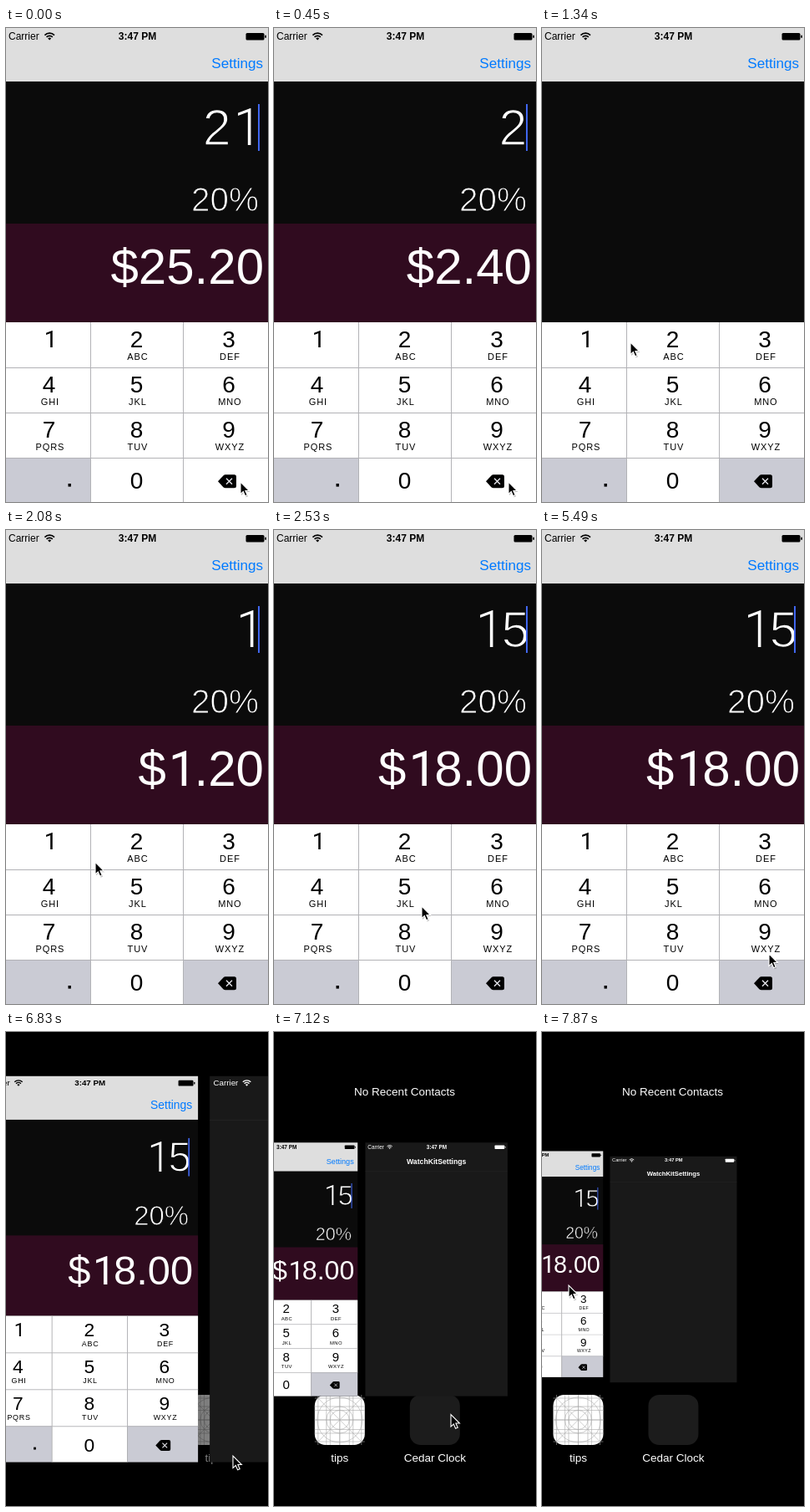
Recreate the animation shown at these times as an HTML page. Size 314x567 px, loop 8000 ms.

```html
<!DOCTYPE html>
<html lang="en">
<head>
<meta charset="utf-8">
<title>Tip calculator</title>
<style>
  html, body { margin: 0; width: 100%; height: 100%; overflow: hidden; background: #000; }
  svg { display: block; width: 100%; height: 100%; }
  text { font-family: "Liberation Sans", Arial, sans-serif; white-space: pre; }
  .one { font-family: Roboto, sans-serif; letter-spacing: -.05em; }
  /* A stroke in the background colour thins the letters. */
  .light { fill: #fff; stroke: #0b0b0b; stroke-width: .026em; }
  .light .one { font-weight: 300; stroke: none; }
  .mid { text-anchor: middle; }
  .end { text-anchor: end; }
  .digit { font-size: 28px; }
  .letters { font-size: 11px; letter-spacing: .9px; }
  .label { font-size: 13.5px; fill: #fff; }
  .guide { fill: none; stroke: #a9a9a9; stroke-width: .6; }
</style>
</head>
<body>
<svg viewBox="0 0 314 567" preserveAspectRatio="none">
  <defs>
    <g id="status" fill="currentColor">
      <text x="3" y="14" font-size="12">Carrier</text>
      <g fill="none" stroke="currentColor" stroke-width="1.7">
        <path d="M46.4 8.6A8.2 8.2 0 0 1 58 8.6"/>
        <path d="M48.6 10.9A5 5 0 0 1 55.8 10.9"/>
      </g>
      <path d="M52.2 14.6L50.2 12.5A2.8 2.8 0 0 1 54.2 12.5Z"/>
      <text class="mid" x="157.5" y="14" font-size="12" font-weight="bold">3:47 PM</text>
      <rect x="287.5" y="6" width="22" height="8.5" rx="1.5"/>
      <rect x="310.3" y="8.6" width="1.6" height="3.4" rx=".8"/>
    </g>
  </defs>

  <rect width="314" height="567"/>

  <g id="switcher">
    <text class="label mid" x="156.5" y="76">No Recent Contacts</text>
    <g id="icons">
      <g transform="translate(13 434)">
        <rect width="60" height="60" rx="13" fill="#fff"/>
        <g id="guides" class="guide">
          <circle cx="30" cy="30" r="27"/>
          <circle cx="30" cy="30" r="16"/>
          <circle cx="30" cy="30" r="11.5"/>
          <path d="M4 4L56 56M56 4L4 56"/>
        </g>
      </g>
      <text class="label mid" x="43" y="513.5">tips</text>
      <rect x="127" y="434" width="60" height="60" rx="13" fill="#1c1c1c"/>
      <text class="label mid" x="157" y="513.5">Cedar Clock</text>
    </g>
  </g>

  <g id="settings">
    <rect x="-2.4" width="318.8" height="567" fill="#191919"/>
    <rect x="-2.4" y="64" width="318.8" height="1" fill="#242424"/>
    <use href="#status" color="#fff"/>
    <text class="mid" x="157" y="48" font-size="16.2" font-weight="bold" fill="#fff">WatchKitSettings</text>
  </g>

  <g id="calculator">
    <rect x="-2.4" width="318.8" height="567" fill="#0b0b0b"/>
    <rect x="-2.4" width="318.8" height="64" fill="#dedede"/>
    <use href="#status" color="#000"/>
    <text class="end" x="308" y="48" font-size="17.1" fill="#007aff">Settings</text>
    <text id="bill" class="light end" x="303.5" y="140" font-size="61"></text>
    <rect id="caret" x="302" y="91" width="2" height="56" fill="#4066ee"/>
    <g id="result">
      <text class="light end" x="303" y="218.5" font-size="40.5">20%</text>
      <rect x="-2.4" y="234" width="318.8" height="118" fill="#300b1f"/>
      <text id="total" class="end" x="309" y="306" font-size="60" fill="#fff"></text>
    </g>
    <g id="keys"></g>
    <path d="M101.5 352V567M212.5 352V567M-2.4 406.5H316.4M-2.4 460.5H316.4M-2.4 514.5H316.4"
          stroke="#b2b2b6" stroke-width="1"/>
    <rect x="74.5" y="545" width="3.4" height="3.6"/>
    <path d="M254 542.3L260.4 535.4Q261.6 534.3 263 534.3H273.5Q276 534.3 276 536.8V547.8Q276 550.3 273.5 550.3H263Q261.6 550.3 260.4 549.2Z"/>
    <path d="M264 538.8L271 545.8M271 538.8L264 545.8" stroke="#e4e4ea" stroke-width="1.4"/>
  </g>

  <g id="cursor">
    <path d="M1 1.5V16L4.3 12.9L6.6 18.3L9.2 17.2L6.9 12H11.4Z" opacity=".25"/>
    <path d="M0 0V14.6L3.3 11.5L5.6 16.8L8.2 15.7L5.9 10.5H10.4Z" stroke="#fff" stroke-width="1.1"/>
  </g>
</svg>

<script>
const LOOP = 8000, TICK = 148.45, OFFSET = 12;
const GRAY = '#cacbd4', WHITE = '#fff';
const SWITCH = 46;   // tick at which the app switcher opens
const $ = id => document.getElementById(id);
const clamp = v => Math.max(0, Math.min(1, v));

// Each key is held for one tick and takes effect on release.
const strokes = [
  { tick: 0, key: 'del' }, { tick: 3, key: 'del' },
  { tick: 11, key: '1' }, { tick: 15, key: '5' }
];

// Pointer stops: tick, x, y
const stops = [
  [4, 281, 543], [9, 106, 376], [11, 72, 371], [13, 72, 371], [16, 177, 450], [19, 177, 450],
  [24, 274, 57], [29, 254, 357], [32, 275, 514], [34, 272, 507], [47, 272, 507],
  [51, 32, 309], [52, 32, 309], [53, 32, 303]
];

function pointerAt(n) {
  const i = stops.findIndex(s => s[0] >= n);
  const b = stops[i], a = stops[Math.max(0, i - 1)];
  const f = b === a ? 0 : (n - a[0]) / (b[0] - a[0]);
  return [1, 2].map(j => a[j] + (b[j] - a[j]) * f);
}

const typeKey = (text, { key }) => key === 'del' ? text.slice(0, -1) : text + key;
const digits = s => s.replace(/1/g, '<tspan class="one" dx=".05em">1</tspan>');

function buildKeys() {
  const names = ['1', '2', '3', '4', '5', '6', '7', '8', '9', 'dot', '0', 'del'];
  const letters = ['', 'ABC', 'DEF', 'GHI', 'JKL', 'MNO', 'PQRS', 'TUV', 'WXYZ'];
  const edges = [-2.4, 101.5, 212.5, 316.4], centers = [51.5, 156.5, 267];
  $('keys').innerHTML = names.map((name, i) => {
    const col = i % 3, row = Math.floor(i / 3), y = 352 + row * 54;
    const x = centers[col], left = edges[col], height = row < 3 ? 54.5 : 53;
    const baseline = row < 3 ? y + 29.6 : 551;
    return `<rect id="key-${name}" x="${left}" y="${y}" width="${edges[col + 1] - left}" height="${height}"/>` +
      (name.length === 1 ? `<text class="digit mid" x="${x}" y="${baseline}">${digits(name)}</text>` : '') +
      (letters[i] ? `<text class="letters mid" x="${x + 1.4}" y="${y + 45}">${letters[i]}</text>` : '');
  }).join('');
  return names;
}

function buildGuides() {
  const offsets = [0, 11.5, 16, 26];
  $('guides').insertAdjacentHTML('beforeend',
    offsets.flatMap(d => [30 - d, 30 + d]).map(p => `<path d="M${p} 0V60M0 ${p}H60"/>`).join(''));
}

const keyNames = buildKeys();
buildGuides();

function placeCard(id, x, y, scale) {
  $(id).setAttribute('transform', `translate(${x} ${y}) scale(${scale}) translate(-157 -283.5)`);
}

// The caret blinks every seven ticks, counted from the last edit.
function caretAlpha(n, edited) {
  const phase = (Math.min(n, SWITCH) - edited) % 7;
  return phase < 3 ? 1 : phase === 3 ? .5 : 0;
}

function draw(n) {
  const done = strokes.filter(s => s.tick < n);
  const bill = done.reduce(typeKey, '21');
  const edited = done.length ? done[done.length - 1].tick + 1 : 0;
  const visible = clamp(Math.max(1 - (n - 3) / 3, (n - 11) / 3));
  $('bill').innerHTML = digits(bill);
  $('total').innerHTML = digits('$' + (bill * 1.2).toFixed(2));
  $('caret').setAttribute('opacity', visible && caretAlpha(n, edited));
  $('result').setAttribute('opacity', visible);

  const pressed = strokes.find(s => s.tick === n)?.key;
  for (const name of keyNames) {
    const special = name.length > 1;
    $('key-' + name).setAttribute('fill', special !== (name === pressed) ? GRAY : WHITE);
  }

  // Opening the app switcher eases out exponentially.
  const open = n < SWITCH ? 0 : 1 - Math.exp(-(n - SWITCH + .5) * .875);
  const scale = 1 - .5238 * open, y = 283.5 + .5 * open;
  placeCard('calculator', 157 - 160 * open, y - (n >= 53 ? 6.3 : 0), scale);
  placeCard('settings', 493 - 336 * open, y, scale);
  $('switcher').setAttribute('opacity', clamp(open * 1.4));
  $('icons').setAttribute('transform', `translate(${319 * (1 - open)} 0)`);

  $('cursor').setAttribute('transform', `translate(${pointerAt(n).join(' ')})`);
}

const start = performance.now();
let shown = -1;
function loop() {
  const n = Math.floor(((performance.now() - start) % LOOP + OFFSET) / TICK);
  // The last tick stays until the loop restarts.
  const tick = Math.min(n, 53);
  if (tick !== shown) draw(shown = tick);
  requestAnimationFrame(loop);
}
loop();
</script>
</body>
</html>
```
